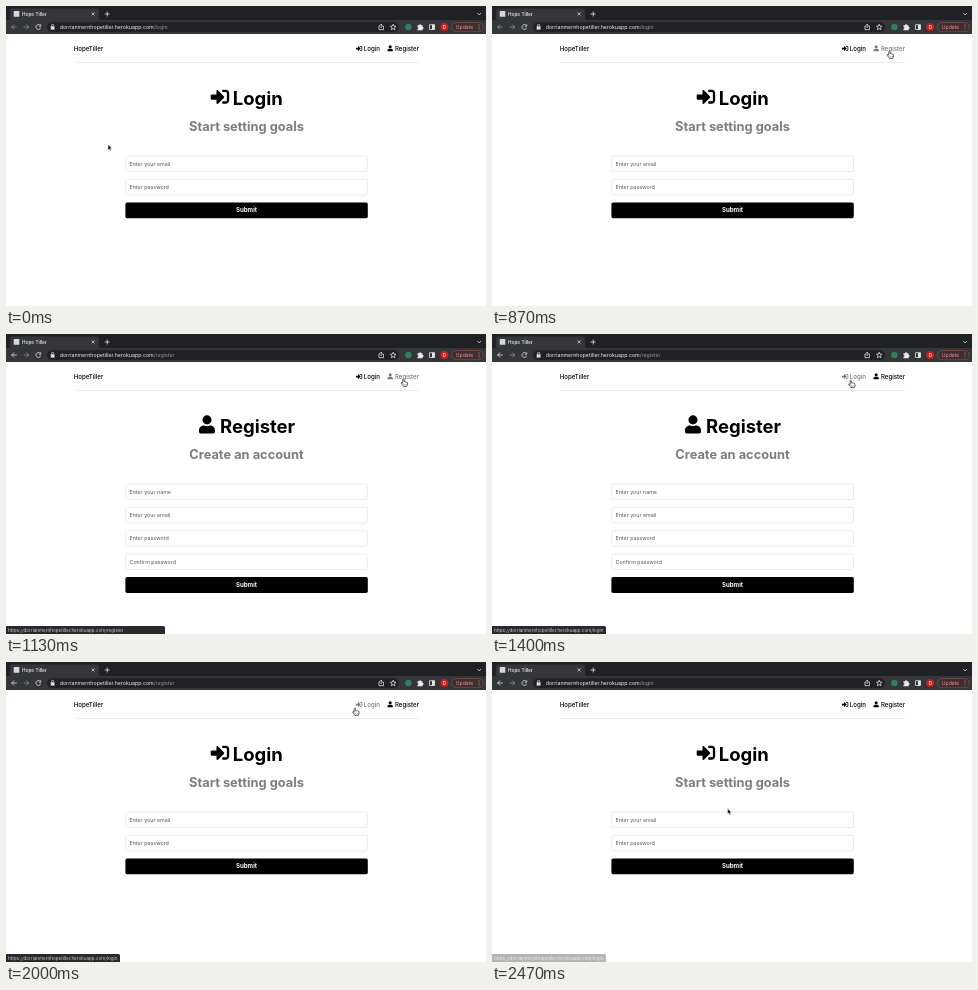
Animation of 480 by 300 pixels, one loop 2540 ms. Source, as an HTML page:

```html
<!DOCTYPE html>
<html lang="en">
<head>
<meta charset="utf-8">
<title>Hope Tiller</title>
<style>
html, body { margin: 0; width: 100%; height: 100%; overflow: hidden; background: #fff; }
svg { display: block; width: 480px; height: 300px; }
text, #status { font-family: Inter, "Open Sans", sans-serif; white-space: pre; }
.mid { text-anchor: middle; }
.nav { font-size: 6.1px; font-weight: 500; }
.title { font-size: 18.5px; font-weight: 700; }
.sub { font-size: 12.85px; font-weight: 700; fill: #7d7d7d; }
.hint { font-size: 5.35px; fill: #555; }
.send { font-size: 6.1px; font-weight: 700; fill: #fff; }
.line { fill: none; stroke: #dee1e6; stroke-width: .8; }
#status {
  position: fixed; left: 0; top: 292px; height: 8px; box-sizing: border-box;
  padding: 0 2px; font-size: 4.58px; line-height: 9.4px; color: #c6c8cb; background: #292a2d;
  border-top-right-radius: 1.5px; overflow: hidden; white-space: nowrap;
}
</style>
</head>
<body>
<svg viewBox="0 0 480 300">
  <defs>
    <path id="enter" d="M416 448h-84c-6.6 0-12-5.4-12-12v-40c0-6.6 5.4-12 12-12h84c17.7 0 32-14.3 32-32V160c0-17.7-14.3-32-32-32h-84c-6.6 0-12-5.4-12-12V76c0-6.6 5.4-12 12-12h84c53 0 96 43 96 96v192c0 53-43 96-96 96zm-47-201L201 79c-15-15-41-4.5-41 17v96H24c-13.3 0-24 10.7-24 24v96c0 13.3 10.7 24 24 24h136v96c0 21.5 26 32 41 17l168-168c9.3-9.4 9.3-24.6 0-34z"/>
    <path id="person" d="M224 256a128 128 0 1 0 0-256a128 128 0 0 0 0 256zm90 32h-17a175 175 0 0 1-146 0h-17C60 288 0 348 0 422v42c0 26 22 48 48 48h352c26 0 48-22 48-48v-42c0-74-60-134-134-134z"/>
  </defs>

  <!-- Browser window -->
  <path d="M0 0H480V28H0z" fill="#202124"/>
  <path d="M0 14H480V28H0zM2 14q2 0 2-2V4.5q0-2 2-2H91q2 0 2 2V12q0 2 2 2z" fill="#35363a"/>
  <rect x="7.7" y="5" width="5.6" height="5.8" rx=".6" fill="#d3d7e0"/>
  <text x="16" y="9.8" font-size="4.75" font-weight="500" fill="#f1f3f4">Hope Tiller</text>
  <path class="line" d="M85.7 6.5l2.8 2.8m0-2.8l-2.8 2.8M98.7 8h5m-2.500-2.500v5M471.3 7l1.9 1.9 1.9-1.9"/>
  <rect x="41" y="16.3" width="352" height="9.7" rx="4.85" fill="#202124"/>
  <path id="back" class="line" d="M10.8 21H5.6m2.5-2.5L5.6 21l2.5 2.5"/>
  <path class="line" stroke-opacity=".45" d="M17.6 21h5.2m-2.5-2.5l2.5 2.5-2.5 2.5"/>
  <path class="line" d="M34.3 19.5a2.4 2.4 0 1 0 .4 2.1M34.7 18.3v1.9h-1.9"/>
  <path d="M44.7 20.3h3.8v3.3h-3.8z" fill="#dee1e6"/>
  <path class="line" d="M45.5 20.5v-1a1.100 1.100 0 0 1 2.200 0v1"/>
  <text x="53.7" y="23" font-size="5.28" fill="#eceef0">dorrianmernhopetiller.herokuapp.com<tspan id="path" fill="#94989d">/login</tspan></text>
  <path class="line" d="M374 20h-1v3.7h4.4V20h-1M375.2 22v-3.8m-1.2 1.2l1.2-1.2 1.2 1.2"/>
  <path class="line" stroke-linejoin="round" d="M387.2 18.2l.8 1.9 2 .2-1.5 1.4.5 2-1.8-1.1-1.8 1.1.5-2-1.5-1.4 2-.2z"/>
  <circle cx="402.4" cy="21" r="3.2" fill="#2c8159"/>
  <path d="M411.5 19.3h1.6a1 1 0 0 1 2 0h1.5v1.6a1 1 0 0 1 0 2v1.3h-5.1v-1.5a.9.9 0 0 0 0-1.8z" fill="#e8eaed"/>
  <path class="line" d="M423.5 18.7h5v4.8h-5z"/>
  <path d="M426 18.7h2.5v4.8H426z" fill="#e8eaed"/>
  <circle cx="438.3" cy="21" r="4" fill="#c5221f"/>
  <text class="mid" x="438.3" y="22.8" font-size="4.8" fill="#fff">D</text>
  <rect x="445.6" y="16.5" width="31.8" height="9.2" rx="4.6" fill="#3d3032" stroke="#8c534f" stroke-width=".6"/>
  <text x="449.8" y="23" font-size="5.1" fill="#f28b82">Update</text>
  <path d="M473 18.9v4.3" stroke="#f28b82" stroke-linecap="round" stroke-dasharray="0 2" stroke-width=".9"/>

  <!-- Page header -->
  <text class="nav" x="67.7" y="44.7">HopeTiller</text>
  <g id="navLogin">
    <use href="#enter" transform="translate(350 39.3) scale(.0123)"/>
    <text class="nav" x="357.8" y="44.7">Login</text>
  </g>
  <g id="navRegister">
    <use href="#person" transform="translate(381.5 39.2) scale(.012)"/>
    <text class="nav" x="389" y="44.7">Register</text>
  </g>
  <path d="M67.7 56.5H413.3" stroke="#e2e2e2" stroke-width=".6"/>

  <g id="login">
    <use href="#enter" transform="translate(204.7 81.5) scale(.0361)"/>
    <text class="title" x="226.7" y="99.2">Login</text>
    <text class="sub mid" x="240.5" y="125">Start setting goals</text>
  </g>
  <g id="register">
    <use href="#person" transform="translate(193 81.3) scale(.0357)"/>
    <text class="title" x="214" y="99.2">Register</text>
    <text class="sub mid" x="240.5" y="125">Create an account</text>
  </g>

  <path id="arrow" d="M0 0V5.6L1.3 4.4 2.2 6.4 3.2 6 2.3 4H4z" stroke="#fff" stroke-width=".5"/>
  <g id="hand">
    <path d="M.2.6Q.9-.3 1.5.6V2.7Q2.3 2.2 2.7 2.9 3.5 2.5 3.9 3.2 4.9 3 5 3.9V5.2Q4.9 6.3 4.3 7.4H.9Q.4 6.3-1 4.8-1.8 3.7-.9 3.5-.3 3.5.2 4.3z" fill="#fff" stroke="#111" stroke-width=".65" stroke-linejoin="round"/>
    <path d="M1.5 5v1.5m1.2-1.5v1.5m1.1-1.5v1.5" stroke="#333" stroke-width=".35"/>
  </g>
</svg>
<div id="status"></div>

<script>
const LOOP = 2540, STEP = 1000 / 15, LAST = 37;
const $ = id => document.getElementById(id);
const show = (id, on) => $(id).setAttribute("display", on ? "inline" : "none");

// Fields stacked from the top, with the submit button below
function buildForm(id, hints) {
  const rowY = i => 150 + i * 23.35;
  const fields = hints.map((hint, i) =>
    `<rect x="119.7" y="${rowY(i)}" width="241.8" height="15.5" rx="1.7" fill="#fff" stroke="#e0e0e0" stroke-width=".6"/>
     <text class="hint" x="123.5" y="${rowY(i) + 9.6}">${hint}</text>`);
  const y = rowY(hints.length);
  $(id).insertAdjacentHTML("beforeend", fields.join("") +
    `<rect x="119.4" y="${y - .3}" width="242.4" height="15.9" rx="1.7"/>
     <text class="send mid" x="240.5" y="${y + 9.7}">Submit</text>`);
}
buildForm("login", ["Enter your email", "Enter password"]);
buildForm("register", ["Enter your name", "Enter your email", "Enter password", "Confirm password"]);

// Pointer stops: step, x, y
const stops = [
  [0, 102, 138.6], [1, 108, 140], [2, 135, 145], [12, 135, 145],
  [13, 396.5, 45], [17, 396.5, 45], [20, 385, 45.5], [21, 358, 46.2],
  [27, 352.7, 41.2], [29, 352.7, 41.2], [30, 348, 46], [LAST, 235.6, 146.6]
];

function pointerAt(n) {
  const i = Math.max(1, stops.findIndex(s => s[0] >= n));
  const [n0, x0, y0] = stops[i - 1], [n1, x1, y1] = stops[i];
  const k = (n - n0) / (n1 - n0);
  return [x0 + (x1 - x0) * k, y0 + (y1 - y0) * k];
}

function statusOpacity(n) {
  const fadeIn = (n - 14) / 2, fadeOut = .35 + (LAST - n) / 3;
  return Math.max(0, Math.min(1, fadeIn, fadeOut));
}

function draw(t) {
  const n = Math.min(LAST, Math.floor((t + 3.4) / STEP));
  const onRegister = n >= 13 && n < 21, onLogin = n >= 21 && n < 31;
  const registerPage = n >= 17 && n < 30;

  show("login", !registerPage);
  show("register", registerPage);
  $("navLogin").setAttribute("fill", onLogin ? "#777" : "#000");
  $("navRegister").setAttribute("fill", onRegister ? "#777" : "#000");
  $("path").textContent = n >= 17 && n < 31 ? "/register" : "/login";
  $("back").setAttribute("stroke-opacity", n < 17 ? .45 : 1);

  const link = n < 21 ? "register" : "login", status = $("status");
  status.textContent = "https://dorrianmernhopetiller.herokuapp.com/" + link;
  status.style.width = (link === "register" ? 159 : 114) + "px";
  status.style.opacity = statusOpacity(n);

  const [x, y] = pointerAt(n), hand = onRegister || onLogin;
  show("hand", hand);
  show("arrow", !hand);
  $(hand ? "hand" : "arrow").setAttribute("transform", `translate(${x} ${y})`);
}

const start = performance.now();
function tick() {
  draw((performance.now() - start) % LOOP);
  requestAnimationFrame(tick);
}
tick();
</script>
</body>
</html>
```
